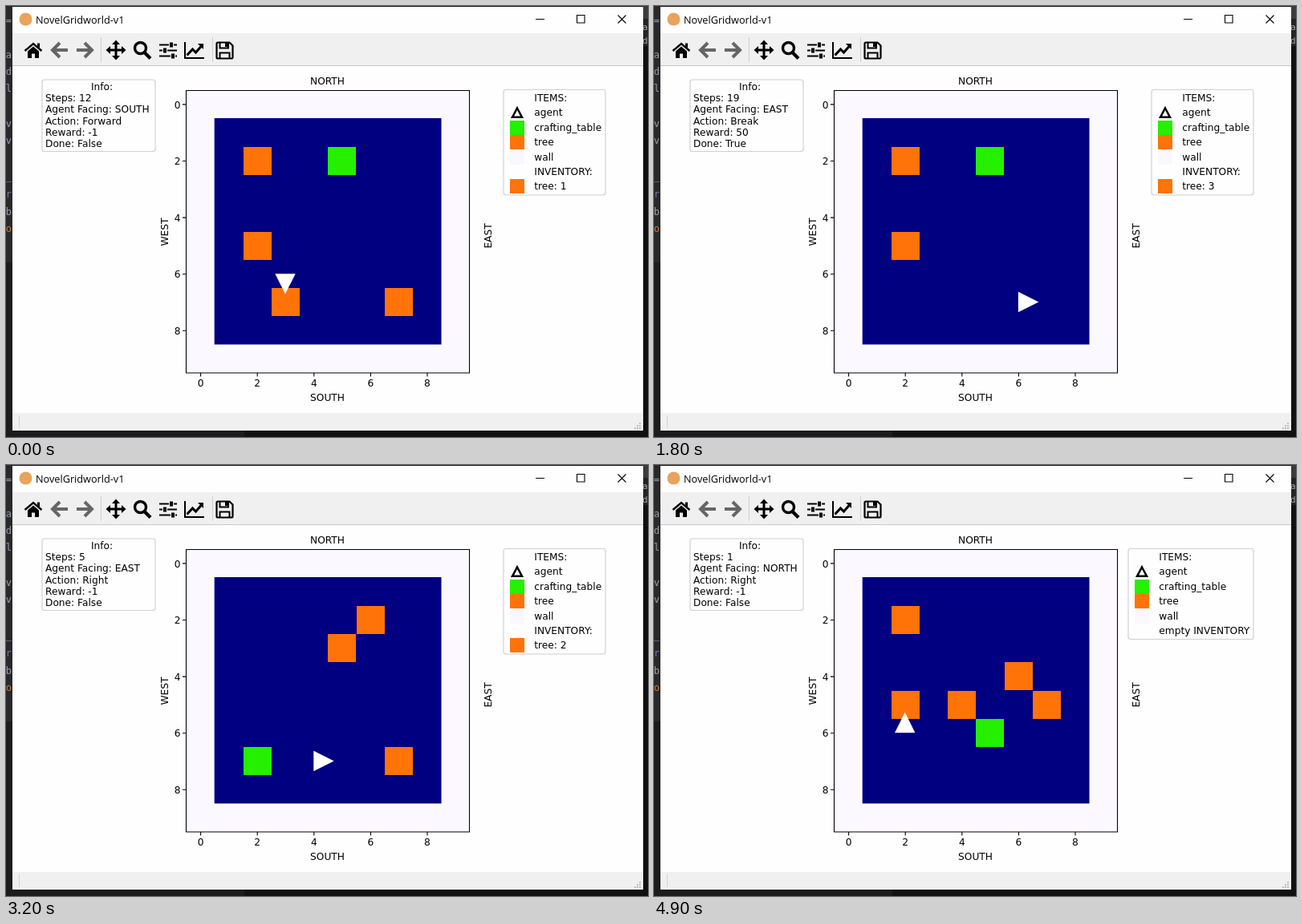
Animation of 800x538 px, one loop 5000 ms. Source, as an HTML page with a canvas:

```html
<!DOCTYPE html>
<html>
<head>
<meta charset="utf-8">
<style>
html, body { margin: 0; width: 100%; height: 100%; overflow: hidden; background: #1b1b1d; }
canvas { display: block; }
</style>
</head>
<body>
<canvas id="stage" width="800" height="538"></canvas>
<script>
const ctx = document.getElementById('stage').getContext('2d');
const LOOP = 5000, GOAL = 3, CELL = 35.3, LEFT = 242.6, TOP = 122.9;
const TREE = '#ff7309', TABLE = '#24f000', WALL = '#fcf8ff';
const PLOT_FONT = '12.2px "DejaVu Sans", sans-serif';
const DIRECTIONS = [['NORTH', 0, -1], ['EAST', 1, 0], ['SOUTH', 0, 1], ['WEST', -1, 0]];

// Each episode: start pose (x, y, direction), then timed actions.
const episodes = [
  { start: 0, steps: 11, count: 1, pose: [3, 5, 2], table: [5, 2],
    trees: [[2, 2], [2, 5], [3, 7], [7, 7]],
    actions: [[0, 'Forward'], [200, 'Break'], [400, 'Forward'], [600, 'Left'],
      [800, 'Forward'], [1000, 'Forward'], [1200, 'Forward'], [1400, 'Break']] },
  { start: 2500, steps: 0, count: 0, pose: [4, 7, 0], table: [2, 7],
    trees: [[6, 2], [5, 3], [7, 7], [3, 7], [4, 6]],
    actions: [[2500, 'Left'], [2700, 'Break'], [2900, 'Right'], [3100, 'Break'],
      [3200, 'Right'], [3400, 'Forward'], [3600, 'Forward'], [3800, 'Break']] },
  { start: 4700, steps: 0, count: 0, pose: [2, 6, 3], table: [5, 6],
    trees: [[2, 2], [2, 5], [4, 5], [6, 4], [7, 5]],
    actions: [[4700, 'Right']] }
];

function worldAt(time) {
  const episode = episodes.filter(e => e.start <= time).pop();
  let { steps, count, trees, table, pose: [x, y, dir] } = episode;
  let action, reward;
  for (const [at, name] of episode.actions) {
    if (at > time) break;
    const [, dx, dy] = DIRECTIONS[dir];
    action = name;
    reward = -1;
    steps++;
    if (name === 'Forward') { x += dx; y += dy; }
    if (name === 'Left') dir = (dir + 3) % 4;
    if (name === 'Right') dir = (dir + 1) % 4;
    if (name === 'Break') {
      trees = trees.filter(([tx, ty]) => tx !== x + dx || ty !== y + dy);
      reward = ++count === GOAL ? 50 : 10;
    }
  }
  return { steps, count, trees, table, x, y, dir, action, reward };
}

function rect(x, y, w, h, color) {
  ctx.fillStyle = color;
  ctx.fillRect(x, y, w, h);
}

function text(string, x, y, align = 'left', color = '#000', font = PLOT_FONT) {
  ctx.font = font;
  ctx.textAlign = align;
  ctx.fillStyle = color;
  ctx.fillText(string, x, y);
}

function stroke(path, width, color = '#000') {
  ctx.lineWidth = width;
  ctx.strokeStyle = color;
  ctx.stroke(new Path2D(path));
}

function fill(path, color = '#000') {
  ctx.fillStyle = color;
  ctx.fill(new Path2D(path));
}

function roundBox(x, y, w, h) {
  ctx.beginPath();
  ctx.roundRect(x, y, w, h, 3);
  ctx.fillStyle = '#fefefe';
  ctx.fill();
  ctx.lineWidth = 1.2;
  ctx.strokeStyle = '#d0d0d0';
  ctx.stroke();
}

function vertical(string, x, y) {
  ctx.save();
  ctx.translate(x, y);
  ctx.rotate(-Math.PI / 2);
  text(string, 0, 0, 'center');
  ctx.restore();
}

function drawDesktop() {
  rect(0, 0, 800, 538, '#111112');
  rect(0, 0, 8, 320, '#29292b');
  rect(0, 320, 297, 218, '#1c1c1e');
  rect(794, 0, 6, 16, '#3c3c3e');
  rect(794, 16, 6, 34, '#242426');
  const code = [['=', 22], ['a', 65], ['d', 86], ['l', 107], ['v', 151], ['v', 172],
    ['i_', 217], ['or', 239, '#7777b0'], ['ob', 261], ['fo', 282, '#cc7832']];
  for (const [part, y, color = '#98a0a8'] of code)
    text(part, 7, y, 'right', color, '12px "DejaVu Sans Mono", monospace');
  for (const [part, y] of [['a', 30], ['d', 47]])
    text(part, 793, y, 'left', '#aaa', '11px "DejaVu Sans Mono", monospace');
}

function drawWindow() {
  rect(8, 1, 786, 529, '#fefefe');
  rect(8, 34, 786, 41, '#f0f0f0');
  rect(8, 74, 786, 1, '#c8c8c8');
  rect(8, 508, 786, 22, '#f0f0f0');
  rect(16, 511, 1, 16, '#d2d2d2');
  for (let i = 0; i < 3; i++)
    for (let j = 0; j <= i; j++) rect(789 - 3 * j, 520 + 3 * i, 2, 2, '#bcbcbc');

  ctx.beginPath();
  ctx.arc(24.5, 16.5, 8, 0, 7);
  ctx.fillStyle = '#e9a35c';
  ctx.fill();
  text('NovelGridworld-v1', 37, 21.5, 'left', '#000', '12.7px "Open Sans", sans-serif');
  stroke('M660 16.5h11M711.5 11.5h9.5v9.5h-9.5zM762.5 11.5l10 10M772.5 11.5l-10 10', 1.1);
}

function drawToolbar() {
  stroke('M118.5 39v31M257.5 39v31', 1, '#d0d0d0');
  // home
  stroke('M23.5 56L34 47L44.5 56', 2.4);
  fill('M27 56.5l7-6 7 6v8.500h-5v-5.500h-4v5.500h-5zM39 46.500h3v6l-3-2.500z');
  // back and forward
  stroke('M58 55h19M67 46l-9 9 9 9', 4, '#666');
  stroke('M88 55h19M98 46l9 9-9 9', 4, '#666');
  // pan
  stroke('M137 46v18M128 55h18', 3);
  fill('M137 42.500l5 5.500h-10zM137 67.500l5-5.500h-10zM124.500 55l5.500-5v10zM149.500 55l-5.500-5v10z');
  // zoom
  stroke('M174.500 52.500a7 7 0 1 1-14 0a7 7 0 1 1 14 0', 3.4);
  stroke('M172.500 58l7.500 7.500', 4.2);
  // sliders
  stroke('M191 48.500h22M191 55.500h22M191 62.500h22', 2);
  for (const [x, y] of [[204, 48.5], [196, 55.5], [206, 62.5]]) {
    rect(x - 1, y - 3, 6, 6, '#f0f0f0');
    rect(x, y - 3, 4, 6, '#000');
  }
  // chart
  stroke('M223 45v20h24', 2);
  stroke('M225.500 61.500l7-7.500 4 4 7-8', 3);
  fill('M239 47h7v7z');
  // save
  stroke('M264 45.500h14.500l4 4v14.500q0 1.500-1.500 1.500h-17q-1.500 0-1.500-1.500v-17q0-1.500 1.500-1.500z', 2.2);
  stroke('M266.500 46v6.500h10.500v-6.500M266.500 65v-6.500h12v6.500', 2);
  rect(273, 46, 3, 5, '#000');
}

function drawCell([x, y], color) {
  rect(Math.round(LEFT + (x - 0.5) * CELL), Math.round(TOP + (y - 0.5) * CELL), 35, 35, color);
}

function drawPlot(world) {
  rect(225, 105, 353, 353, WALL);
  rect(259.7, 140, 282.8, 282.5, '#000080');
  world.trees.forEach(tree => drawCell(tree, TREE));
  drawCell(world.table, TABLE);

  ctx.save();
  ctx.translate(LEFT + world.x * CELL - 0.5, TOP + world.y * CELL - 0.5);
  ctx.rotate(world.dir * Math.PI / 2);
  fill('M-12.700 0h25.400L0-25.400z', '#fff');
  ctx.restore();

  stroke('M224.500 105.500h353v352.500h-353z', 1.1);
  for (let n = 0; n < 10; n += 2) {
    const x = LEFT + n * CELL, y = TOP + n * CELL;
    stroke(`M${x} 458v4.500M220 ${y}h4.500`, 1.1);
    text(n, x, 475, 'center');
    text(n, 217.5, y + 4.7, 'right');
  }
  text('NORTH', 400.5, 98, 'center');
  text('SOUTH', 400.5, 493, 'center');
  vertical('WEST', 201.5, 282);
  vertical('EAST', 604.8, 287);
}

function drawInfo(world) {
  roundBox(45, 92, 141, 89.5);
  text('Info:', 119.5, 105, 'center');
  [
    `Steps: ${world.steps}`,
    `Agent Facing: ${DIRECTIONS[world.dir][0]}`,
    `Action: ${world.action}`,
    `Reward: ${world.reward}`,
    `Done: ${world.count === GOAL ? 'True' : 'False'}`
  ].forEach((line, i) => text(line, 49, 119.2 + i * 14.15));
}

function drawLegend(count) {
  const x = count ? 620 : 591;
  const rows = [['ITEMS:'], ['agent'], ['crafting_table', TABLE], ['tree', TREE], ['wall', '#faf8fe']];
  if (count) rows.push(['INVENTORY:'], [`tree: ${count}`, TREE]);
  else rows.push(['empty INVENTORY']);
  roundBox(x, 104.5, 747 - x, count ? 131.5 : 113);
  rows.forEach(([label, color], i) => {
    const y = 114.5 + i * 18.4;
    text(label, x + 38.3, y + 4.5);
    if (color) rect(x + 8, Math.round(y - 8.5), 18, 18, color);
  });
  stroke(`M${x + 17} 127.500l6 11.300h-12z`, 2.5);
}

function draw(now) {
  const world = worldAt(now % LOOP + 10);
  drawDesktop();
  drawWindow();
  drawToolbar();
  drawPlot(world);
  drawInfo(world);
  drawLegend(world.count);
  requestAnimationFrame(draw);
}
requestAnimationFrame(draw);
</script>
</body>
</html>
```
